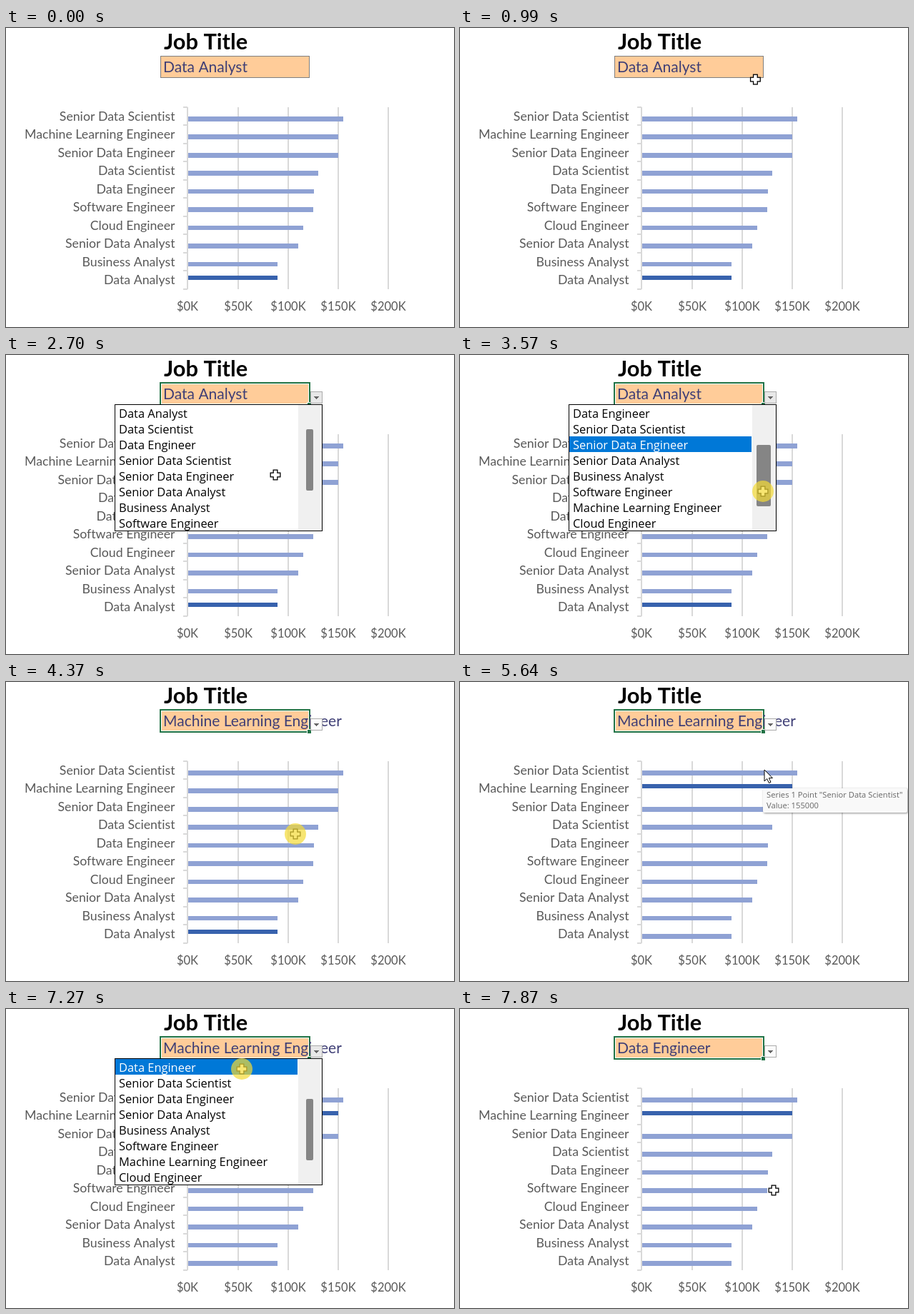
Animation of 627 by 419 pixels, one loop 8 s. Source, as an HTML page with a canvas:

```html
<!DOCTYPE html>
<html lang="en">
<head>
<meta charset="utf-8">
<title>Job title chart</title>
<style>
html, body { margin: 0; width: 100%; height: 100%; overflow: hidden; background: #fff; }
canvas { display: block; }
</style>
</head>
<body>
<canvas id="stage" width="627" height="419"></canvas>
<script>
const ctx = document.getElementById('stage').getContext('2d');
const LOOP = 8000;

// Salaries in thousands of dollars
const salaries = {
  'Senior Data Scientist': 155, 'Machine Learning Engineer': 150,
  'Senior Data Engineer': 150, 'Data Scientist': 130, 'Data Engineer': 126,
  'Software Engineer': 125, 'Cloud Engineer': 115, 'Senior Data Analyst': 110,
  'Business Analyst': 90, 'Data Analyst': 90
};
const options = ['Data Analyst', 'Data Scientist', 'Data Engineer',
  'Senior Data Scientist', 'Senior Data Engineer', 'Senior Data Analyst',
  'Business Analyst', 'Software Engineer', 'Machine Learning Engineer',
  'Cloud Engineer'];

// Moments of each press of the pointer; the sheet reacts a little later
const press = { cell: 1130, open: 2290, drag: 3370, pick: 4300, reopen: 6250, repick: 7250 };
const LAG = 70, PRESS_TIME = 220;

const button = { x: 432, y: 58 };
const firstRow = { x: 330, y: 84 };
const moves = [
  { start: 130, end: 920, x: 415, y: 79, shape: 'cross' },
  { start: 920, end: press.cell, x: 409, y: 53, shape: 'cross' },
  { start: 1270, end: 1500, x: 466, y: 66, shape: 'cross' },
  { start: 1500, end: 1780, x: 422, y: 58, shape: 'hand' },
  { start: 1900, end: 2150, ...button, shape: 'hand' },
  { start: 2360, end: 2700, x: 377, y: 168, shape: 'cross' },
  { start: 3100, end: 3330, x: 424, y: 169, shape: 'cross' },
  { start: press.drag, end: 3540, x: 424, y: 191, shape: 'cross' },
  { start: 3640, end: 4100, x: 405, y: 213, shape: 'cross' },
  { start: 4760, end: 5040, x: 426, y: 130, shape: 'arrow' },
  { start: 5500, end: 5570, x: 426, y: 123, shape: 'arrow' },
  { start: 5850, end: 6200, ...button, shape: 'hand' },
  { start: 6380, end: 6590, x: 434, y: 90, shape: 'cross' },
  { start: 6590, end: 7070, ...firstRow, shape: 'cross' },
  { start: 7340, end: 7870, x: 439, y: 254, shape: 'cross' }
];

const within = (t, a, b) => t >= a && t < b;
const progress = (t, a, b) => Math.min(1, Math.max(0, (t - a) / (b - a)));
const ease = u => u * u * (3 - 2 * u);
const listOpen = t => within(t, press.open + LAG, press.pick + LAG)
  || within(t, press.reopen + LAG, press.repick + LAG);

function pointerAt(t) {
  const pointer = { x: 570, y: 387, shape: null };
  for (const move of moves.filter(m => m.start <= t)) {
    const u = ease(progress(t, move.start, move.end));
    pointer.x += (move.x - pointer.x) * u;
    pointer.y += (move.y - pointer.y) * u;
    pointer.shape = move.shape;
  }
  return pointer;
}

function rect(x, y, w, h, fill) {
  ctx.fillStyle = fill;
  ctx.fillRect(x, y, w, h);
}

function rounded(x, y, w, h, radius, fill) {
  ctx.beginPath();
  ctx.roundRect(x, y, w, h, radius);
  ctx.fillStyle = fill;
  ctx.fill();
}

function frame(x, y, w, h, color, width = 1) {
  ctx.strokeStyle = color;
  ctx.lineWidth = width;
  ctx.strokeRect(x + width / 2, y + width / 2, w - width, h - width);
}

function text(str, x, y, font, fill, align = 'left') {
  ctx.font = font;
  ctx.letterSpacing = '0.01px'; // keeps ligatures off
  ctx.fillStyle = fill;
  ctx.textAlign = align;
  ctx.fillText(str, x, y);
}

function drawChart(t) {
  const left = 254, top = 111, row = 25.45, scale = 1.405;
  for (let value = 0; value <= 200; value += 50) {
    const x = Math.ceil(left + value * scale);
    rect(x - 1, top, 2, 255, '#d9d9d9');
    text(`$${value}K`, x, 396, '16.5px Lato, sans-serif', '#595959', 'center');
  }
  for (let i = 0; i <= 10; i++) rect(248, Math.round(top + i * row) - 1, 6, 2, '#d9d9d9');

  const swap = progress(t, 4760, 5040);
  const highlight = { 'Data Analyst': 1 - swap, 'Machine Learning Engineer': swap };
  Object.entries(salaries).forEach(([name, value], i) => {
    const y = Math.round(top + 13 + i * row);
    const bottom = Math.round(top + 19.6 + i * row);
    const dark = highlight[name] ?? 0;
    const width = share => Math.round(value * scale * share - share);
    rect(left + 1, y, width(1 - dark), bottom - y, '#8fa2d4');
    rect(left + 1, y - 6, width(dark), 6, '#3862ad');
    text(name, 236.5, 130 + i * row, '17.7px Lato, sans-serif', '#595959', 'right');
  });
}

function drawCell(t) {
  text('Job Title', 221, 30, 'bold 30.8px Lato, sans-serif', '#000');
  rect(216, 39, 209, 31, '#ffcc99');
  const selected = t >= press.cell + 2 * LAG;
  if (selected) {
    frame(217, 40, 207, 29, '#fff');
    frame(215, 38, 211, 33, '#217346', 2);
    rect(421, 66, 7, 7, '#fff');
    rect(422, 67, 5, 5, '#217346');
  } else {
    frame(216, 39, 209, 31, '#7f7f7f');
  }
  const value = t < press.pick + LAG ? 'Data Analyst'
    : t < press.repick + LAG ? 'Machine Learning Engineer' : 'Data Engineer';
  text(value, 220, 62, '21px Lato, sans-serif', '#3f3f76');
  if (selected) {
    rect(426, 51, 17, 17, listOpen(t) ? '#e8e8e8' : '#fbfbfb');
    frame(426, 51, 17, 17, '#ababab');
    for (let i = 0; i < 4; i++) rect(431 + i, 58 + i, 7 - 2 * i, 1, '#666');
  }
}

function drawList(t, pointer) {
  if (!listOpen(t)) return;
  const dragging = within(t, press.drag, 3640);
  const scroll = Math.round(2 * progress(t, press.drag, 3540));
  const hover = t < 2800 ? '' : t < 3980 ? 'Senior Data Engineer'
    : t < 6760 ? 'Machine Learning Engineer' : 'Data Engineer';
  rect(152, 69, 291, 178, '#fff');
  options.slice(scroll, scroll + 8).forEach((name, i) => {
    const active = name === hover;
    if (active) rect(153, 70 + i * 22, 255, 22, '#0078d7');
    text(name, 158, 88 + i * 22, '16.4px "Open Sans", sans-serif', active ? '#fff' : '#000');
  });
  rect(409, 70, 33, 176, '#f0f0f0');

  const thumbWidth = within(t, 3240, 3760) ? 20 : 10;
  const offset = dragging ? pointer.y - 169 : scroll * 11;
  rounded(425 - thumbWidth / 2, 104 + offset, thumbWidth, 86, 2, '#858585');
  frame(152, 69, 291, 178, '#000');
}

function drawTooltip(t) {
  if (!within(t, 5520, 5900)) return;
  ctx.save();
  ctx.shadowColor = 'rgba(0,0,0,.45)';
  ctx.shadowBlur = 3;
  ctx.shadowOffsetX = ctx.shadowOffsetY = 1;
  rounded(424, 149, 202, 34, 2, '#f9f9f9');
  ctx.restore();
  const font = '11.2px "Open Sans", sans-serif';
  text('Series 1 Point "Senior Data Scientist"', 429, 162, font, '#666');
  text('Value: 155000', 429, 177, font, '#666');
}

// Each pointer is drawn twice: a black shape, then a smaller white one
const pointers = {
  arrow(inset) {
    if (inset) return;
    const outline = new Path2D('M0 0V16L3.7 12.6 6.4 18.5 9 17.3 6.4 11.6H11.4Z');
    ctx.fillStyle = '#fff';
    ctx.fill(outline);
    ctx.lineWidth = 1;
    ctx.strokeStyle = '#000';
    ctx.stroke(outline);
  },
  cross(inset, color) {
    const long = 7.5 - inset, short = 3.5 - inset;
    rect(-long, -short, 2 * long, 2 * short, color);
    rect(-short, -long, 2 * short, 2 * long, color);
  },
  hand(inset, color) {
    const part = (x, y, w, h) =>
      rounded(x + inset, y + inset, w - 2 * inset, h - 2 * inset, 2, color);
    part(-2, -1, 5, 16);
    part(-6, 9, 7, 6);
    part(-3, 6, 14, 11);
    part(-2, 12, 11, 9);
  }
};

function drawPointer(t, { x, y, shape }) {
  if (!shape) return;
  ctx.save();
  ctx.translate(x, y);
  pointers[shape](0, '#000');
  pointers[shape](1.3, '#fff');
  if (Object.values(press).some(start => within(t, start, start + PRESS_TIME))) {
    ctx.globalAlpha = 0.7;
    rounded(-15, -15, 30, 30, 15, '#f4da35');
  }
  ctx.restore();
}

function draw(now) {
  const t = now % LOOP;
  const pointer = pointerAt(t);
  rect(0, 0, 627, 419, '#fff');
  drawChart(t);
  drawCell(t);
  drawList(t, pointer);
  drawTooltip(t);
  drawPointer(t, pointer);
  requestAnimationFrame(draw);
}
requestAnimationFrame(draw);
</script>
</body>
</html>
```
